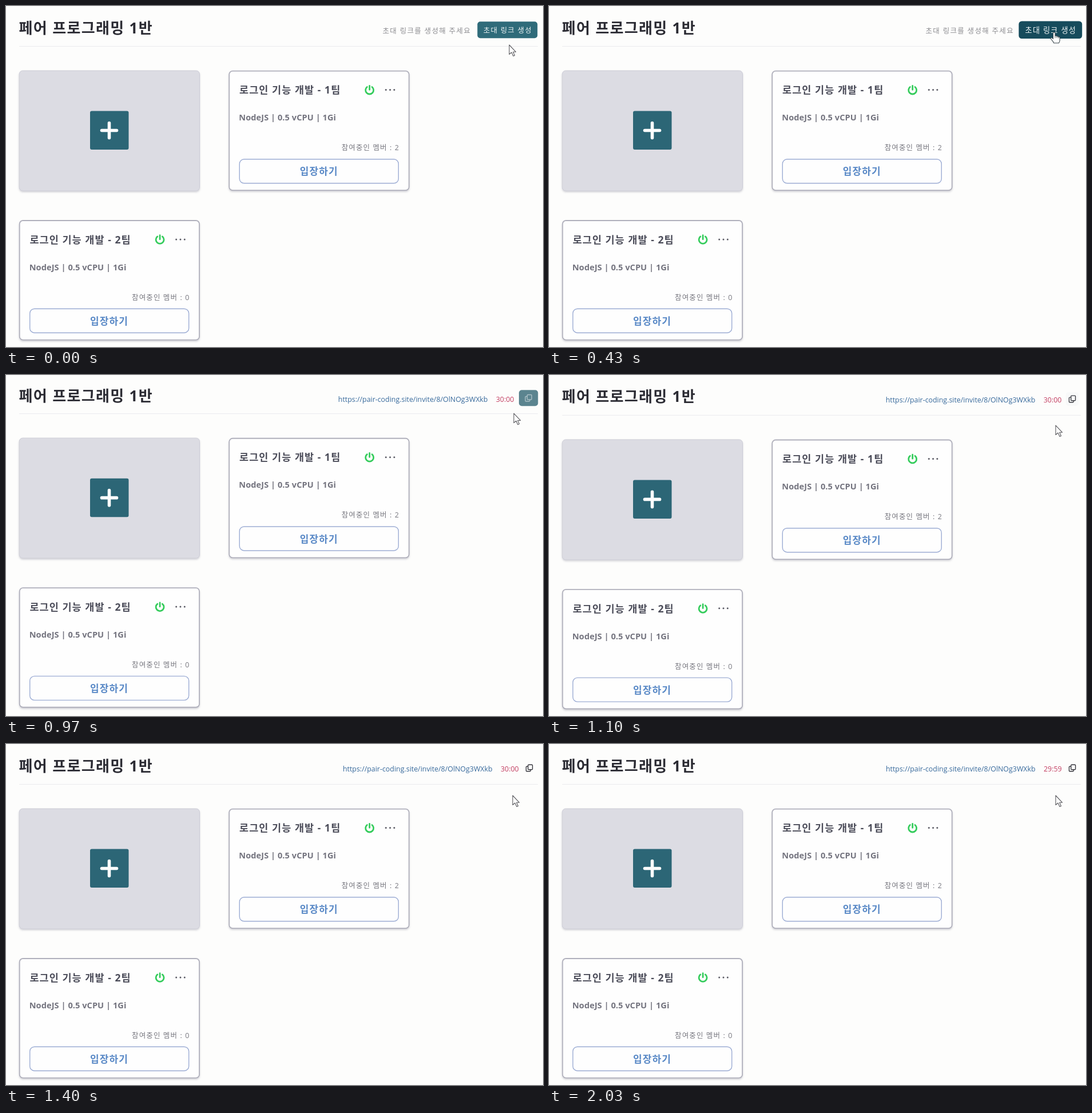
Recreate the animation shown at these times as an HTML page. Size 939 by 596 pixels, loop 2060 ms.

```html
<!DOCTYPE html>
<html lang="ko">
<head>
<meta charset="utf-8">
<title>페어 프로그래밍</title>
<style>
  html, body { margin: 0; width: 100%; height: 100%; overflow: hidden; background: #fdfdfc; }
  svg { display: block; width: 100vw; height: 100vh; }
  text { font-family: "Open Sans", "Noto Sans CJK KR", "Noto Sans CJK JP", "Noto Sans CJK", sans-serif; white-space: pre; }
  .title { font-size: 26px; font-weight: 700; letter-spacing: 1.35px; fill: #2b2b33; }
  .name { font-size: 17.5px; font-weight: 700; letter-spacing: 1.05px; fill: #4b4c59; }
  .spec { font-size: 14.6px; font-weight: 700; letter-spacing: .05px; fill: #74747f; }
  .members { font-size: 12.5px; font-weight: 500; letter-spacing: 1.1px; fill: #77777f; }
  .enter { font-size: 17px; font-weight: 700; letter-spacing: 1.1px; fill: #5888c6; }
  .hint { font-size: 12.5px; letter-spacing: 1.3px; fill: #8c8c90; }
  .action { font-size: 12.5px; font-weight: 500; letter-spacing: 1.2px; fill: #eef4f5; }
  .link { font-size: 12.4px; }
</style>
</head>
<body>
<svg viewBox="0 0 939 596" xmlns="http://www.w3.org/2000/svg">
  <defs>
    <filter id="shadow" x="-5%" y="-5%" width="110%" height="115%">
      <feDropShadow dx="0" dy="2" stdDeviation="1.6" flood-color="#55556a" flood-opacity=".26"/>
    </filter>
  </defs>
  <rect width="939" height="596" fill="#fdfdfc"/>

  <g id="heading">
    <text class="title" x="22.5" y="47.5">페어 프로그래밍 1반</text>
  </g>

  <g id="content">
    <path d="M23 70.5H930" stroke="#ebebee"/>
    <rect x="23.2" y="113" width="315.3" height="210" rx="6" fill="#dcdce3" stroke="#ccccd6" filter="url(#shadow)"/>
    <rect x="147" y="183.5" width="67.5" height="67.5" rx="3" fill="#2c6676"/>
    <path d="M167.5 217.5H193.5M180.5 204.5V230.5" stroke="#fcfdfd" stroke-width="5.6" stroke-linecap="round"/>
    <g id="cards"></g>
  </g>

  <g id="invite">
    <text class="hint" x="658.5" y="47.5">초대 링크를 생성해 주세요</text>
    <g id="button">
      <rect id="buttonBox" x="-52.5" y="-14.5" width="105" height="29" rx="5"/>
      <text class="action" x="-42" y="5">초대 링크 생성</text>
    </g>
  </g>

  <g id="result">
    <g id="linkRow">
      <text class="link" x="589" y="48" fill="#386a9c">https://pair-coding.site/invite/8/OlNOg3WXkb</text>
      <text id="timer" class="link" x="865" y="48" fill="#c33f62"></text>
    </g>
    <rect id="copyBox" rx="5"/>
    <g id="copyIcon" fill="none" stroke-width="1.4" stroke-linejoin="round">
      <rect x="-2.2" y="-5.8" width="7.8" height="8.6" rx="1.2"/>
      <path d="M-2.2 -2.8H-4.4Q-5.5 -2.8 -5.5 -1.7V4.7Q-5.5 5.8 -4.4 5.8H1Q2.2 5.8 2.2 4.7V2.8"/>
    </g>
  </g>

  <path id="arrow" d="M0 0V16.5L4 13L7 19.5L9.5 18.4L6.7 12.3H11.6Z" fill="#fff" stroke="#5a5a5e" stroke-width="1.1" stroke-linejoin="round"/>
  <g id="hand" fill="#fff" stroke="#3e4a50" stroke-width="1.1" stroke-linejoin="round">
    <path d="M-2 1.5Q-2 0 -.3 0Q1.5 0 1.5 1.5V6.3Q3.6 5.5 4.5 7Q6.6 6.4 7.2 8Q9.7 7.6 9.7 10V13.5Q9.7 16 8 18.8H-.8Q-2 15.8 -4.6 13.2Q-7 10.5 -5.8 9.7Q-4.4 8.9 -2 11.5Z"/>
    <path d="M1.5 6.3V10M4.5 7V10M7.2 8V10.5" fill="none" stroke-width=".8"/>
  </g>
</svg>
<script>
const LOOP = 2060;
const HOVER_START = 140, LINK_SHOWN = 930, TRANSITION = 200, TICK = 1970;
const TEAL = [47, 107, 122], DARK_TEAL = [22, 75, 92];
const PALE = [190, 213, 219], INK = [55, 55, 62];

// time, x, y of the pointer tip
const POINTER = [
  [0, 880, 68], [30, 880, 68], [160, 883.5, 46], [870, 883.5, 46],
  [970, 888, 67], [1100, 886, 88], [1200, 886, 90], [LOOP, 886, 90]
];

const el = id => document.getElementById(id);
const set = (id, attrs) => {
  for (const key in attrs) el(id).setAttribute(key, attrs[key]);
};
const show = (id, on) => set(id, { visibility: on ? "visible" : "hidden" });
const move = (id, x, y, scale = 1) => set(id, { transform: `translate(${x} ${y}) scale(${scale})` });
const lerp = (a, b, p) => a + (b - a) * p;
const mix = (a, b, p) => `rgb(${a.map((v, i) => Math.round(lerp(v, b[i], p)))})`;
const easeOut = (t, start) => {
  const p = Math.min(1, Math.max(0, (t - start) / TRANSITION));
  return 1 - (1 - p) ** 2;
};

function card(x, y, team, members) {
  return `<g transform="translate(${x} ${y})">
    <rect x=".3" y=".3" width="314.4" height="208.6" rx="6" fill="#fefefe" stroke="#b0b0bc" stroke-width="1.8" filter="url(#shadow)"/>
    <text class="name" x="18" y="40">로그인 기능 개발 - ${team}팀</text>
    <g fill="none" stroke="#35cc5c" stroke-width="2.8" stroke-linecap="round">
      <path d="M241.4 28.2A7 7 0 1 0 250 28.2M245.7 26V33"/>
    </g>
    <g fill="#5a5a64"><circle cx="274.3" cy="33.2" r="1.5"/><circle cx="281.6" cy="33.2" r="1.5"/><circle cx="288.9" cy="33.2" r="1.5"/></g>
    <text class="spec" x="17.3" y="87">NodeJS | 0.5 vCPU | 1Gi</text>
    <text class="members" x="196.7" y="139">참여중인 멤버 : ${members}</text>
    <rect x="18.3" y="154.5" width="278" height="42" rx="8" fill="#fefefe" stroke="#9dadd4" stroke-width="1.4"/>
    <text class="enter" x="123.7" y="182.2">입장하기</text>
  </g>`;
}

function pointerAt(t) {
  const i = POINTER.findIndex(k => k[0] > t);
  const [a, b] = [POINTER[i - 1], POINTER[i]];
  const p = (t - a[0]) / (b[0] - a[0]);
  return [lerp(a[1], b[1], p), lerp(a[2], b[2], p)];
}

function render(t) {
  const linked = t >= LINK_SHOWN;
  const hover = easeOut(t, HOVER_START);
  const settle = easeOut(t, LINK_SHOWN);
  const rest = linked ? 1 - settle : 0;

  move("heading", 0, -2.5 * rest);
  move("content", 0, -4.5 * rest);

  show("invite", !linked);
  move("button", 876.8, 41.7, 1 + .055 * hover);
  set("buttonBox", { fill: mix(TEAL, DARK_TEAL, hover) });

  show("result", linked);
  move("linkRow", -13 * rest, -2.2 * rest);
  const width = 22 + 18 * rest, height = 24 + 6 * rest;
  const x = 915 - 2.2 * rest, y = 42 - 2.8 * rest;
  set("copyBox", {
    x: x - width / 2, y: y - height / 2, width, height,
    fill: mix(DARK_TEAL, TEAL, settle), "fill-opacity": Math.min(1, 1.15 * rest)
  });
  move("copyIcon", x, y);
  set("copyIcon", { stroke: mix(PALE, INK, settle ** 2) });
  el("timer").textContent = t < TICK ? "30:00" : "29:59";

  const [px, py] = pointerAt(t);
  const pressing = t >= HOVER_START && !linked;
  show("arrow", !pressing);
  show("hand", pressing);
  move(pressing ? "hand" : "arrow", px, py);
}

el("cards").innerHTML = card(390, 113.3, 1, 2) + card(23.4, 374.7, 2, 0);

const start = performance.now();
function tick() {
  render((performance.now() - start) % LOOP);
  requestAnimationFrame(tick);
}
tick();
</script>
</body>
</html>
```
